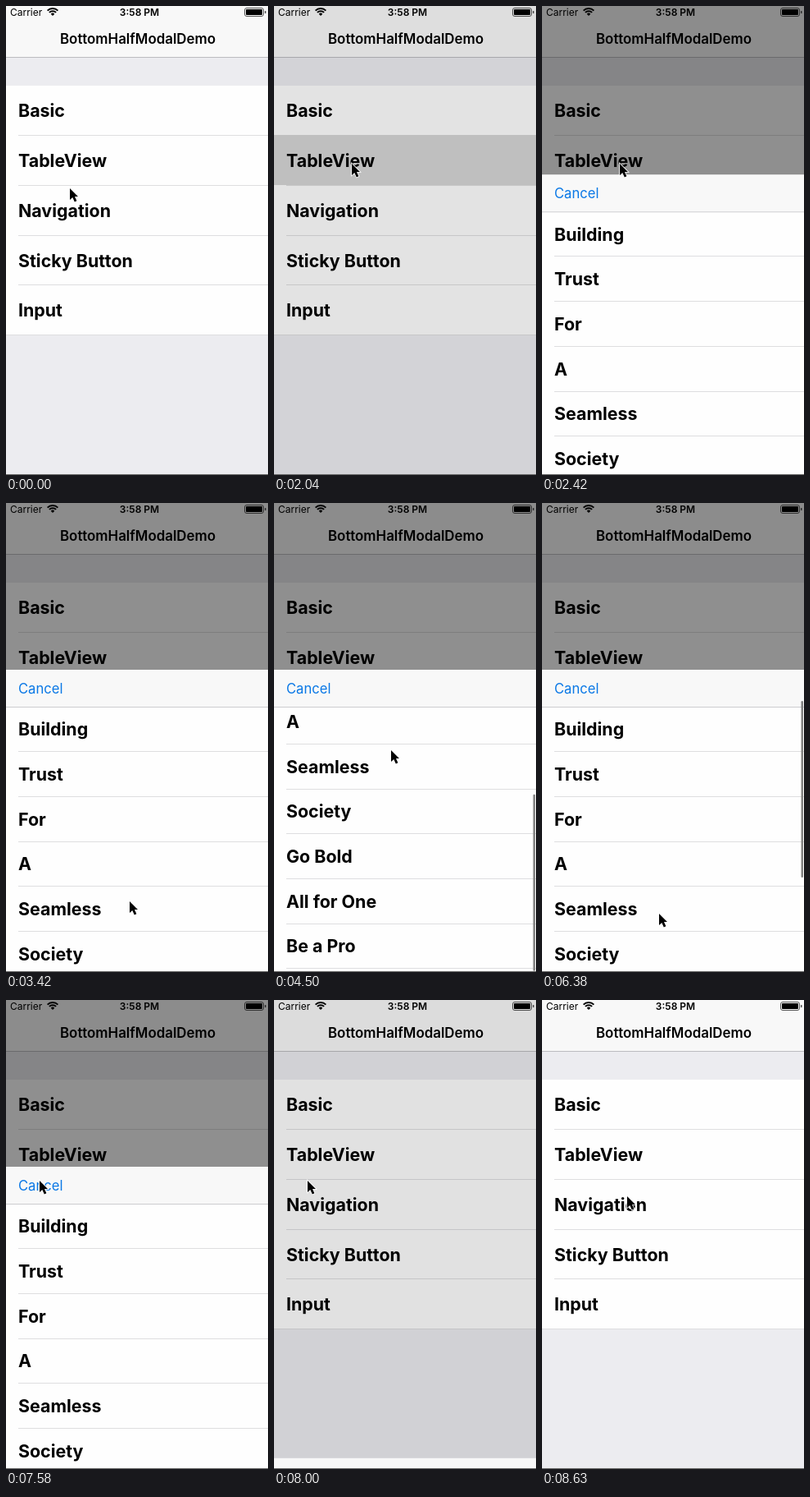
Animation, 320 px wide and 571 px high, one loop 8.68 s. Source, as an HTML page with a canvas:

```html
<!DOCTYPE html>
<html lang="en">
<head>
<meta charset="utf-8">
<title>Bottom half modal</title>
<style>
  html, body { margin: 0; width: 100%; height: 100%; overflow: hidden; }
  canvas { display: block; width: 320px; height: 571px; }
</style>
</head>
<body>
<canvas id="stage"></canvas>
<script>
const LOOP = 8680, W = 320, H = 571;
const MENU = ['Basic', 'TableView', 'Navigation', 'Sticky Button', 'Input'];
const ITEMS = ['Building', 'Trust', 'For', 'A', 'Seamless', 'Society', 'Go Bold', 'All for One', 'Be a Pro'];
const MENU_TOP = 97, MENU_ROW = 60.7, ROW = 54.7;
const SHEET_TOP = 203, HEADER = 45, MAX_SCROLL = 173.5;
const INK = '#000', BAR = '#f8f8f8', BACK = '#ececf0', CELL = '#fefefe';
const LINE = '#dedee0', EDGE = '#bcbcc0', PRESSED = '#d6d6d6', BLUE = '#0a78e6';
const DIM = .44;

const canvas = document.getElementById('stage');
const c = canvas.getContext('2d');
const scale = window.devicePixelRatio || 1;
canvas.width = W * scale;
canvas.height = H * scale;

const clamp = (v, lo = 0, hi = 1) => Math.min(hi, Math.max(lo, v));
const mix = (a, b, u) => a + (b - a) * u;
const smooth = u => u * u * (3 - 2 * u);
const easeOut = u => 1 - (1 - u) ** 3;
const span = (t, from, to) => clamp((t - from) / (to - from));

// Keys are [time, value...]; each stretch is eased at both ends.
function pose(keys, t) {
  const i = keys.findIndex(k => k[0] > t);
  if (i < 0) return keys[keys.length - 1].slice(1);
  if (i === 0) return keys[0].slice(1);
  const a = keys[i - 1], b = keys[i];
  const u = smooth(span(t, a[0], b[0]));
  return a.slice(1).map((v, n) => mix(v, b[n + 1], u));
}

const CURSOR = [
  [0, 78, 222], [500, 78, 222], [1650, 95, 192], [2650, 95, 192],
  [3400, 151, 485], [3620, 151, 485], [4450, 143, 301], [5500, 143, 301],
  [6100, 143, 500], [6600, 143, 500], [7500, 41, 220], [8130, 41, 220],
  [8600, 104, 239]
];
const BAR_ALPHA = [
  [3650, 0], [3720, 1], [4850, 1], [5080, 0],
  [5510, 0], [5560, 1], [6700, 1], [7000, 0]
];

function scrollAt(t, y) {
  if (t < 3620 || t > 6100) return 0;
  const moved = t < 5500 ? 475 - y : MAX_SCROLL - Math.max(0, y - 311);
  return clamp(moved, 0, MAX_SCROLL);
}

function rect(color, x, y, w, h) {
  c.fillStyle = color;
  c.fillRect(x, y, w, h);
}

function pill(color, x, y, w, h, r) {
  c.fillStyle = color;
  c.beginPath();
  c.roundRect(x, y, w, h, r);
  c.fill();
}

function text(str, x, y, size, weight, color = INK, align = 'left') {
  c.font = `${weight} ${size}px Inter, Roboto, sans-serif`;
  c.letterSpacing = '0px';
  c.textAlign = align;
  c.fillStyle = color;
  c.fillText(str, x, y);
}

const rowLabel = (str, y) => text(str, 15, y, 21.4, 700);

function statusBar() {
  text('Carrier', 5, 12, 12, 400);
  text('3:58 PM', 163, 12, 12, 600, INK, 'center');
  c.strokeStyle = INK;
  c.lineWidth = 2;
  for (const r of [5.8, 9]) {
    c.beginPath();
    c.arc(57, 12, r, -Math.PI * .75, -Math.PI * .25);
    c.stroke();
  }
  c.beginPath();
  c.moveTo(57, 12);
  c.arc(57, 12, 3.2, -Math.PI * .75, -Math.PI * .25);
  c.fill();
  c.lineWidth = 1;
  c.strokeStyle = '#555';
  c.beginPath();
  c.roundRect(291.5, 2.5, 23, 10, 2.5);
  c.stroke();
  pill(INK, 293, 4, 20, 7, 1);
  rect('#555', 316, 6, 1.5, 3);
}

function menu(t) {
  rect(BACK, 0, 0, W, H);
  rect(BAR, 0, 0, W, 62);
  rect(EDGE, 0, 62, W, 1);
  statusBar();
  text('BottomHalfModalDemo', 161, 46, 16.9, 600, INK, 'center');

  const height = MENU_ROW * MENU.length;
  rect(CELL, 0, MENU_TOP, W, height);
  MENU.forEach((label, i) => {
    const y = MENU_TOP + i * MENU_ROW;
    if (i) rect(LINE, 15, Math.floor(y), W - 15, 1);
    if (i === 1 && t > 1860) {
      c.globalAlpha = 1 - smooth(span(t, 2060, 2420));
      rect(PRESSED, 0, Math.floor(y), W, 61);
      c.globalAlpha = 1;
    }
    rowLabel(label, y + 38.4);
  });
  rect(LINE, 0, Math.floor(MENU_TOP + height), W, 1);
}

function sheet(top, scroll, barAlpha) {
  const listTop = top + HEADER;
  c.save();
  c.beginPath();
  c.rect(0, top, W, H);
  c.clip();
  rect(CELL, 0, top, W, H);
  ITEMS.forEach((label, i) => {
    const y = listTop + i * ROW - scroll;
    rowLabel(label, y + 35.3);
    rect(LINE, 15, Math.floor(y + ROW), W - 15, 1);
  });
  rect(BAR, 0, top, W, HEADER);
  rect('#ccccd0', 0, listTop, W, 1);
  text('Cancel', 15, top + 29, 16.6, 400, BLUE);

  c.globalAlpha = barAlpha;
  pill('#808080', 316.5, top + 38 + scroll * .656, 2.5, 215, 1.2);
  c.restore();
}

const ARROW = new Path2D('M0 0V14L3.3 11L5.8 16.5L8.4 15.3L6 10H10Z');

function cursor(x, y) {
  c.save();
  c.translate(x, y);
  c.lineWidth = 1.6;
  c.strokeStyle = '#fff';
  c.stroke(ARROW);
  c.fillStyle = INK;
  c.fill(ARROW);
  c.restore();
}

function draw(t) {
  const [x, y] = pose(CURSOR, t);
  const dim = smooth(span(t, 1920, 2300)) - smooth(span(t, 7700, 8150));
  const shown = easeOut(span(t, 2070, 2500)) - easeOut(span(t, 7700, 8150));

  c.setTransform(scale, 0, 0, scale, 0, 0);
  menu(t);
  rect(`rgba(0,0,0,${dim * DIM})`, 0, 0, W, H);
  if (shown > 0) sheet(mix(H, SHEET_TOP, shown), scrollAt(t, y), pose(BAR_ALPHA, t)[0]);
  rect('#666', 0, H - 1, W, 1);
  cursor(x, y);
}

const start = performance.now();
function tick() {
  draw((performance.now() - start) % LOOP);
  requestAnimationFrame(tick);
}
tick();
</script>
</body>
</html>
```
